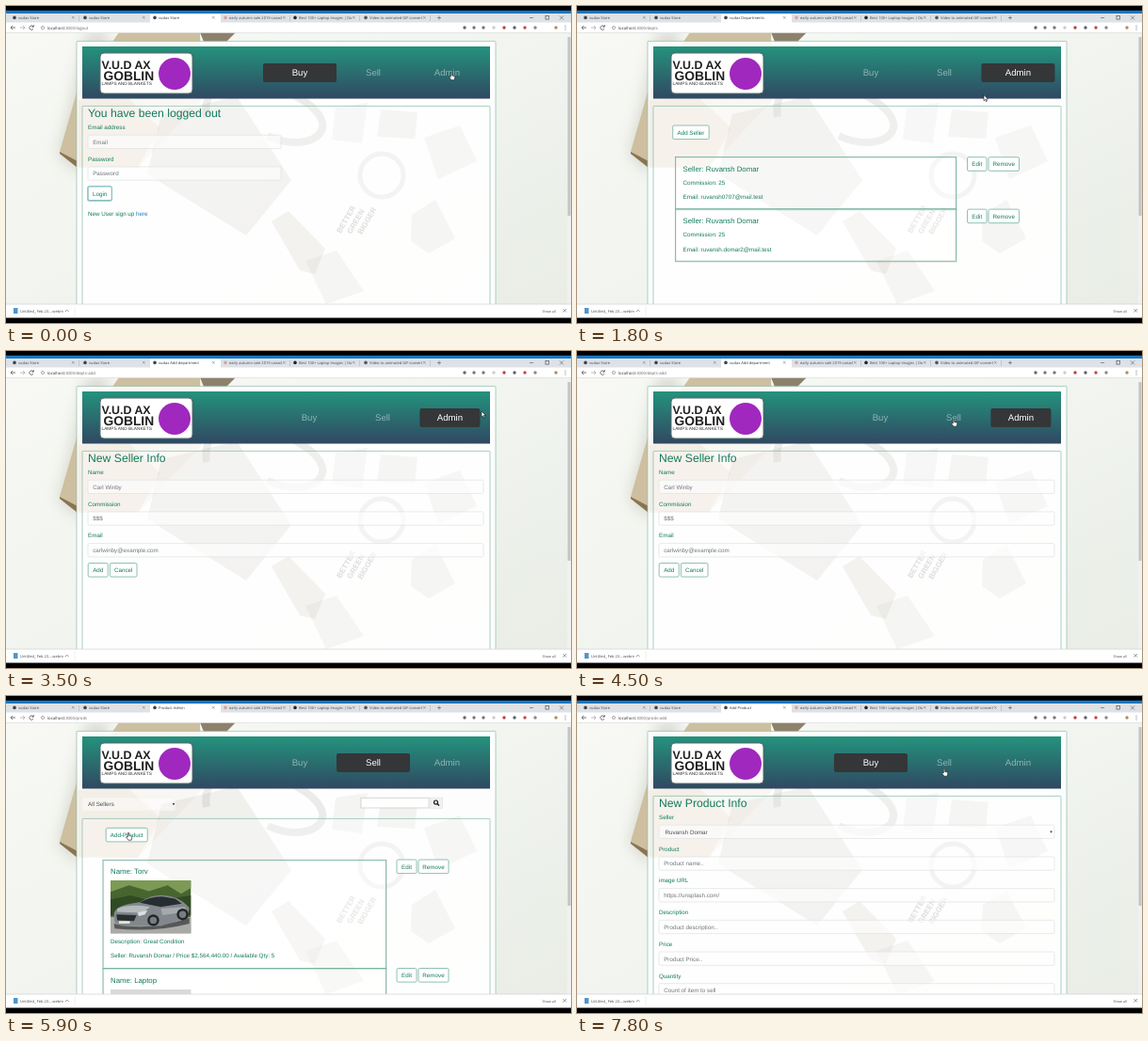
Recreate the animation shown at these times as an HTML page. Size 600 by 337 pixels, loop 8000 ms.

```html
<!DOCTYPE html>
<html lang="en">
<head>
<meta charset="utf-8">
<title>Store demo</title>
<style>
  html, body { margin: 0; width: 100%; height: 100%; overflow: hidden; background: #000; }
  svg { display: block; width: 100vw; height: 100vh; }
  text { font-family: "Liberation Sans", Arial, sans-serif; white-space: pre; text-rendering: geometricPrecision; }
  .ui { font-family: "Open Sans", sans-serif; }
</style>
</head>
<body>
<svg id="stage" viewBox="0 0 600 337"></svg>
<script>
const LOOP = 8000;
const GREEN = '#137a5e', GREY = '#70777c', INK = '#495057';

// Drawing helpers, each returning SVG markup
const text = (x, y, s, size = 6.25, fill = GREEN, more = '') =>
  `<text x="${x}" y="${y}" font-size="${size}" fill="${fill}" ${more}>${s}</text>`;
const rect = (x, y, w, h, fill, more = '') =>
  `<rect x="${x}" y="${y}" width="${w}" height="${h}" fill="${fill}" ${more}/>`;
const path = (d, fill = 'none', more = '') => `<path d="${d}" fill="${fill}" ${more}/>`;
const circle = (x, y, r, fill, more = '') => `<circle cx="${x}" cy="${y}" r="${r}" fill="${fill}" ${more}/>`;
const line = (d, color, width = .8) => path(d, 'none', `stroke="${color}" stroke-width="${width}"`);
const frame = (x, y, w, h, color, fill = 'none', r = 1.5) =>
  rect(x, y, w, h, fill, `rx="${r}" stroke="${color}" stroke-width=".7"`);
const BOLD = 'font-weight="700"', MIDDLE = 'text-anchor="middle"';

const button = (x, y, w, label) =>
  frame(x, y, w, 14.6, '#5fa693', '#fff') + text(x + w / 2, y + 9.6, label, 6.25, GREEN, MIDDLE);
const input = (x, y, w, value = '', color = GREY) =>
  frame(x, y, w, 14.3, '#dde2e2', 'rgba(255,255,255,.6)') + text(x + 5.2, y + 9.5, value, 6.25, color);
const arrowDown = (x, y) => path(`M${x - 1.3} ${y}h2.6l-1.3 2.2z`, '#333');
const field = (i, label, value, w = 420) =>
  text(87, 131 + i * 33.7, label) + input(87, 137.2 + i * 33.7, w, value);
const heading = s => text(87, 118, s, 12.2);
const panel = y => frame(81, y, 433, 320, '#85bbaa', 'rgba(255,255,255,.2)', 1);
const listCard = (x, y, w, h) =>
  rect(x + .5, y + .7, w, h, 'none', 'stroke="#8c9f98" stroke-width="1.6" opacity=".25"') +
  rect(x, y, w, h, 'rgba(255,255,255,.3)', 'stroke="#6db09d" stroke-width=".8"');

function car(x, y, w, h) {
  return `<svg x="${x}" y="${y}" width="${w}" height="${h}" viewBox="0 0 96 64" preserveAspectRatio="none">
    ${rect(0, 0, 96, 64, '#47652f')}
    ${path('M0 0H96V9L84 16 68 6 46 13 22 6 0 14z', '#7c9a55')}
    ${path('M0 23L24 18 50 25 96 18V42H0z', '#304a24')}
    ${rect(0, 44, 96, 20, '#a9aaa6')}${path('M4 52Q45 62 94 45V52Q52 63 5 58z', '#565957')}
    ${path('M4 40Q6 31 24 28L36 26Q48 17 64 18Q80 19 90 29L94 33 92 45 60 55 14 55 5 51z', '#82888c')}
    ${path('M35 27Q46 19 62 19.5L77 22 85 28 60 32z', '#262e32')}
    ${path('M8 34Q24 28 47 32L38 39 8 38z', '#b5babd')}
    ${path('M60 34L89 32 90 38 62 42z', '#a4aaad')}
    ${path('M7 41L31 42 28 49 8 48z', '#292f32')}
    ${path('M32 39L44 36 41 41 34 43z', '#dce1e2')}
    ${[[51, 48], [86, 41]].map(([a, b]) => circle(a, b, 7, '#222628') + circle(a, b, 4.2, '#777d80')).join('')}
    ${rect(10, 49, 13, 3, '#ece9d4')}</svg>`;
}

function backdrop() {
  const soft = (d, fill, o) => path(d, fill, `opacity="${o}"`);
  return rect(0, 28, 600, 290, 'url(#room)') +
    path('M70 100L55 158 80 180 110 28H85z', '#c8c9bd', 'filter="url(#blur)" opacity=".7"') +
    path('M120 28L206 28 208 100 140 172 76 170 57 155 75 92z', '#cdbf9f') +
    path('M57 155L76 165 76 172 57 157z', '#8a7450') +
    path('M206 28H244L234 38H210z', '#8d816c') +
    frame(75, 37.4, 445, 300, '#8fbcad', 'rgba(255,255,255,.88)', 1) +
    soft('M77 100L130 98 164 130 140 172 77 172z', '#d8cdb6', .22) +
    soft('M165 115L245 96 303 185 255 244 168 190 150 178z', '#9a9287', .13) +
    line('M213 118C205 68 275 72 318 102S320 158 278 138', 'rgba(95,90,82,.11)', 8) +
    soft('M350 108L384 103 378 146 346 142z', '#aaa89f', .1) +
    soft('M398 110L437 113 434 141 394 139z', '#918f89', .1) +
    soft('M444 140L482 127 500 165 459 184z', '#b5b2a6', .13) +
    circle(399, 180, 23, 'none', 'stroke="#8d8a82" stroke-width="5" opacity=".11"') +
    soft('M282 229L300 218 339 258 328 285 312 281z', '#a59a86', .15) +
    soft('M318 271L351 260 380 303 340 317z', '#aaa69d', .13) +
    soft('M431 222L456 206 477 247 449 263 430 250z', '#b6b4ab', .15) +
    `<g transform="translate(352 240) rotate(-60)" opacity=".3">${
      ['BETTER', 'GREEN', 'BIGGER'].map((s, i) => text(i * 5, 4 + i * 10, s, 8, '#77736c', BOLD)).join('')}</g>`;
}

function header(active, shift = 0) {
  const lastWidth = shift ? 64 : 78;
  const items = ['Buy', 'Sell', 'Admin'].map((label, i) => {
    const w = i === 2 ? lastWidth : 78, x = 273 + shift + i * 78 + (i === 2 ? .4 : 0);
    const on = i === active;
    return (on ? rect(x, 61, w, 20, '#343638', 'rx="2"') : '') +
      text(x + w / 2, 74.4, label, 9.6, on ? '#fff' : '#92b3b3', MIDDLE);
  }).join('');
  return rect(81, 43, 433, 55.5, 'url(#nav)') +
    rect(100, 50, 98, 43, '#fff', 'rx="4" stroke="#596d70" stroke-width="1" filter="url(#shadow)"') +
    text(101.5, 66.5, 'V.U.D AX', 12.4, '#202020', BOLD) +
    text(103.5, 78.7, 'GOBLIN', 13.8, '#202020', BOLD) +
    text(101.5, 84.4, 'LAMPS AND BLANKETS', 4.75, '#303030') +
    circle(179, 72, 17, '#a028be') + items;
}

const loginForm = title => panel(106.4) + heading(title) +
  field(0, 'Email address', 'Email', 205) + field(1, 'Password', 'Password', 205) +
  rect(86, 191, 27, 17, '#a9d3ee', 'rx="2.5"') + button(87.2, 192, 25, 'Login') +
  text(87, 222.8, `New User sign up <tspan fill="#167fc0">here</tspan>`);

function buyPage() {
  const quantity = y => text(450, y, 'Qty:') + input(450, y + 3, 57, '1', INK);
  return frame(348, 105, 60, 14, '#e8ecea', 'rgba(255,255,255,.6)') +
    text(354, 114.4, 'All Sellers', 6.25, INK) + arrowDown(404, 111) +
    button(411, 104.8, 32, 'login') + button(449, 104.8, 30, 'logout') + button(482.5, 104.8, 31, '') +
    path('M485.5 108h1.5l1 5h5l1-4h-6.5', GREEN, `stroke="${GREEN}" stroke-width=".7"`) +
    circle(489, 115, .9, GREEN) + circle(492.3, 115, .9, GREEN) +
    text(494.5, 114.5, '...Cart', 5.9, GREEN, BOLD + ' style="font-family:\'Liberation Serif\',serif"') +
    panel(127.4) + rect(87, 134, 420.5, 20, 'rgba(218,211,193,.7)') +
    text(91, 147.6, 'Products for sale', 10, GREEN, BOLD) +
    listCard(103, 160.5, 335, 125) + listCard(103, 285.5, 335, 125) +
    text(111, 176, 'Name: Torv', 7.8) + car(111, 183, 96, 63.5) +
    text(111, 259.5, 'Description: Great Condition') +
    text(111, 275.2, `<tspan ${BOLD}>Seller</tspan>: Ruvansh Domar / Price $2,564,440.00 / Available Quantity: 5`) +
    text(111, 301.3, 'Name: Laptop', 7.8) +
    quantity(167.3) + button(450, 191, 42, 'Add to Cart') + quantity(292.6);
}

function sellersPage() {
  const seller = (y, email) => listCard(104.5, y, 298, 55.3) +
    text(112.5, y + 15.5, 'Seller: Ruvansh Domar', 7.8) +
    text(112.5, y + 29, 'Commission: 25') + text(112.5, y + 44.6, 'Email: ' + email) +
    button(414.5, y + .2, 20.5, 'Edit') + button(437, y + .2, 32.5, 'Remove');
  return panel(106.4) + button(101.7, 127, 38.5, 'Add Seller') +
    seller(160.5, 'ruvansh0707@mail.test') + seller(215.9, 'ruvansh.domar2@mail.test');
}

const newSellerPage = () => panel(106.4) + heading('New Seller Info') +
  field(0, 'Name', 'Carl Winby') + field(1, 'Commission', '$$$') +
  field(2, 'Email', 'carlwinby@example.com') + button(87.2, 225.5, 21, 'Add') + button(110.4, 225.5, 28.6, 'Cancel');

function sellPage() {
  const actions = y => button(415, y, 21, 'Edit') + button(438, y, 32, 'Remove');
  return frame(81, 108, 99, 14, '#edf0ee', 'rgba(255,255,255,.5)') +
    text(87, 117.4, 'All Sellers', 6.25, INK) + arrowDown(178, 114) +
    rect(377, 108.2, 72, 10.8, '#fff', 'stroke="#bbb" stroke-width=".6"') +
    rect(450.2, 108, 13.6, 11.3, '#f1f1f1', 'stroke="#ddd" stroke-width=".5"') +
    circle(456.5, 113, 2, 'none', 'stroke="#111" stroke-width="1.1"') + line('M458 114.5l2 2', '#111', 1.3) +
    panel(130.4) + button(106.2, 140.3, 44, 'Add-Product') +
    listCard(103, 174.3, 300.5, 115.3) + listCard(103, 289.6, 300.5, 115) +
    text(111, 189.3, 'Name: Torv', 7.8) + car(111, 196, 85.5, 56.5) +
    text(111, 262.8, 'Description: Great Condition') +
    text(111, 278.3, 'Seller: Ruvansh Domar / Price $2,564,440.00 / Available Qty: 5') +
    text(111, 304.8, 'Name: Laptop', 7.8) + rect(111, 312, 85.5, 20, '#d9dad8') +
    actions(174) + actions(289.5);
}

const newProductPage = seller => panel(106.4) + heading('New Product Info') +
  field(0, 'Seller', '') + text(93.5, 146.8, seller, 6.25, INK) + arrowDown(503.5, 143.5) +
  field(1, 'Product', 'Product name..') + field(2, 'image URL', 'https://unsplash.com/') +
  field(3, 'Description', 'Product description..') + field(4, 'Price', 'Product Price..') +
  field(5, 'Quantity', 'Count of item to sell');

const SCREENS = [
  { at: 0, title: 'vudax Store', url: '/logout', nav: 0, body: loginForm('You have been logged out') },
  { at: 400, title: 'vudax Store', url: '/login', nav: 0, body: loginForm('Login') },
  { at: 900, title: 'vudax Store', url: '', nav: 0, body: buyPage() },
  { at: 1500, title: 'vudax Departments', url: '/depts', nav: 2, body: sellersPage() },
  { at: 2800, title: 'vudax Add department', url: '/depts-add', nav: 2, shift: 10, body: newSellerPage() },
  { at: 4700, title: 'Product Admin', url: '/prods', nav: 1, body: sellPage() },
  { at: 6000, title: 'Add Product', url: '/prods-add', nav: 0, body: newProductPage('') },
  { at: 6500, title: 'Add Product', url: '/prods-add', nav: 0, body: newProductPage('Ruvansh Domar') },
];

function browser() {
  const ui = (x, y, s, size = 4.2, fill = '#45484c') => text(x, y, s, size, fill, 'class="ui"');
  const tabs = [
    [9, 'vudax Store', '#3d4248'], [84, 'vudax Store', '#3d4248'], [158, '', '#3d4248'],
    [233, 'early autumn sale 2019 canada - S', '#d8a39b'],
    [307, 'Best 100+ Laptop Images | Downl', '#222'], [382, 'Video to animated GIF converter', '#555'],
  ].map(([x, label, color], i) =>
    circle(x, 12.4, 1.8, color) +
    `<svg x="${x + 4}" y="8" width="56" height="10">${ui(0, 6, label, 4)}</svg>` +
    line(`M${x + 61} 11l2.6 2.6m0-2.6l-2.6 2.6`, '#666', .5) +
    (i !== 1 && i !== 2 ? line(`M${x + 68.5} 10v6`, '#a8abb0', .5) : '')).join('');
  const tools = [
    [487, '#666'], [497, '#777'], [507, '#777'], [518, '#ccc'], [529, '#c33b3b'], [540, '#5b6065'],
    [551, '#c74646'], [562, '#888'], [584, '#b28b5b'],
  ].map(([x, c]) => circle(x, 23, 1.7, c)).join('');
  return rect(0, 0, 600, 8, '#000') + rect(0, 4.8, 600, 3.4, '#1977c4') + rect(0, 8, 600, 10, '#dee1e6') +
    rect(153, 8.5, 75, 10, '#fff', 'rx="1.5"') + rect(0, 17.5, 600, 11, '#fff') +
    tabs + line('M458 12.5h4m-2-2v4M556 12.5h4M588 10.5l4 4m0-4l-4 4', '#555', .6) +
    frame(573, 10.5, 3.6, 3.6, '#555', 'none', 0) +
    line('M10 23H5l2-2m-2 2l2 2', '#555') + line('M15 23h5l-2-2m2 2l-2 2', '#aaa') +
    line('M29 22a2.2 2.2 0 1 0 0 2.2M29.3 20v2.2h-2', '#555') + circle(39, 23, 1.6, 'none', 'stroke="#777" stroke-width=".6"') +
    tools + [21, 23, 25].map(y => circle(594, y, .5, '#555')).join('') +
    line('M0 28.5H600', '#d5d8da', .6) +
    rect(596, 29, 4, 288, '#f1f1f1') + rect(596.5, 33, 3, 190, '#c4c4c4') +
    rect(0, 317, 600, 15, '#fff') + line('M0 317H600', '#cfd2d3', .7) +
    rect(8, 321, 4.5, 6, '#5195c9') + ui(15, 326, 'Untitled_ Feb 23....webm', 4) +
    line('M63 325l1.8-1.8 1.8 1.8', '#555', .6) + line('M73 319v10', '#ddd', .5) +
    ui(569.5, 325.8, 'Show all', 3.7) + line('M591.5 322l3.5 3.5m0-3.5l-3.5 3.5', '#555', .6) +
    rect(0, 331.5, 600, 6, '#000');
}

const stage = document.getElementById('stage');
stage.innerHTML = `<defs>
  <linearGradient id="nav" x2="0" y2="1"><stop stop-color="#24937d"/><stop offset="1" stop-color="#304862"/></linearGradient>
  <linearGradient id="room" x2="1" y2="1"><stop stop-color="#f8f9f4"/><stop offset=".5" stop-color="#f1f4ef"/><stop offset="1" stop-color="#e9ede6"/></linearGradient>
  <filter id="blur" x="-50%" width="200%"><feGaussianBlur stdDeviation="8"/></filter>
  <filter id="shadow" x="-10%" y="-10%" width="120%" height="120%"><feDropShadow dx=".4" dy=".8" stdDeviation="1" flood-color="#29483f" flood-opacity=".35"/></filter>
  </defs>` + backdrop() +
  SCREENS.map(s => `<g class="screen">${header(s.nav, s.shift)}${s.body}</g>`).join('') + browser() +
  text(162, 13.9, '', 4, '#303236', 'id="title" class="ui"') +
  `<text class="ui" x="44" y="24.7" font-size="4.3" fill="#303236">localhost:<tspan id="url" fill="#666"></tspan></text>` +
  `<g id="cursor">${path('M0 0v6.2l1.5-1.3 1 2.2 1-.5-1-2.1h2z', '#fff', 'stroke="#111" stroke-width=".6"')}
   ${path('M-.7.6q.7-1 1.4 0v2.8l2.5.7q.7.3.6 1.2l-.6 2.9h-3.3l-2.4-3.2q.3-1 1.8 0z', '#fff', 'stroke="#111" stroke-width=".6"')}</g>`;

const screens = [...stage.querySelectorAll('.screen')];
const cursor = document.getElementById('cursor');
const [arrow, hand] = cursor.children;
const title = document.getElementById('title'), url = document.getElementById('url');

// Pointer stops: time, x, y
const STOPS = [
  [0, 473, 70.5], [1400, 472.5, 70.5], [1800, 432, 94.5], [2300, 432, 94.5], [2600, 121, 134],
  [3200, 121, 134], [3500, 505, 64], [3700, 505, 64], [4500, 400, 72], [5500, 400, 72],
  [5900, 130, 145], [7000, 130, 145], [7700, 390, 77], [LOOP, 390, 77],
];
const HAND_TIMES = [[0, 1500], [2550, 2800], [4400, 5550], [5850, 6000], [7600, LOOP]];

function pointerAt(t) {
  const i = STOPS.findIndex(s => s[0] > t);
  const [t0, x0, y0] = STOPS[i - 1], [t1, x1, y1] = STOPS[i];
  const p = (t - t0) / (t1 - t0), e = p * p * (3 - 2 * p);
  return [x0 + (x1 - x0) * e, y0 + (y1 - y0) * e];
}

function draw(now) {
  const t = Math.floor(now % LOOP / 100) * 100;
  const current = SCREENS.findLastIndex(s => s.at <= t);
  screens.forEach((g, i) => { g.style.display = i === current ? '' : 'none'; });
  title.textContent = SCREENS[current].title;
  url.textContent = '3000' + SCREENS[current].url;
  const overLink = HAND_TIMES.some(([from, to]) => t >= from && t < to);
  arrow.style.display = overLink ? 'none' : '';
  hand.style.display = overLink ? '' : 'none';
  cursor.setAttribute('transform', `translate(${pointerAt(t)})`);
}

const start = performance.now();
function tick() {
  draw(performance.now() - start);
  requestAnimationFrame(tick);
}
tick();
</script>
</body>
</html>
```
